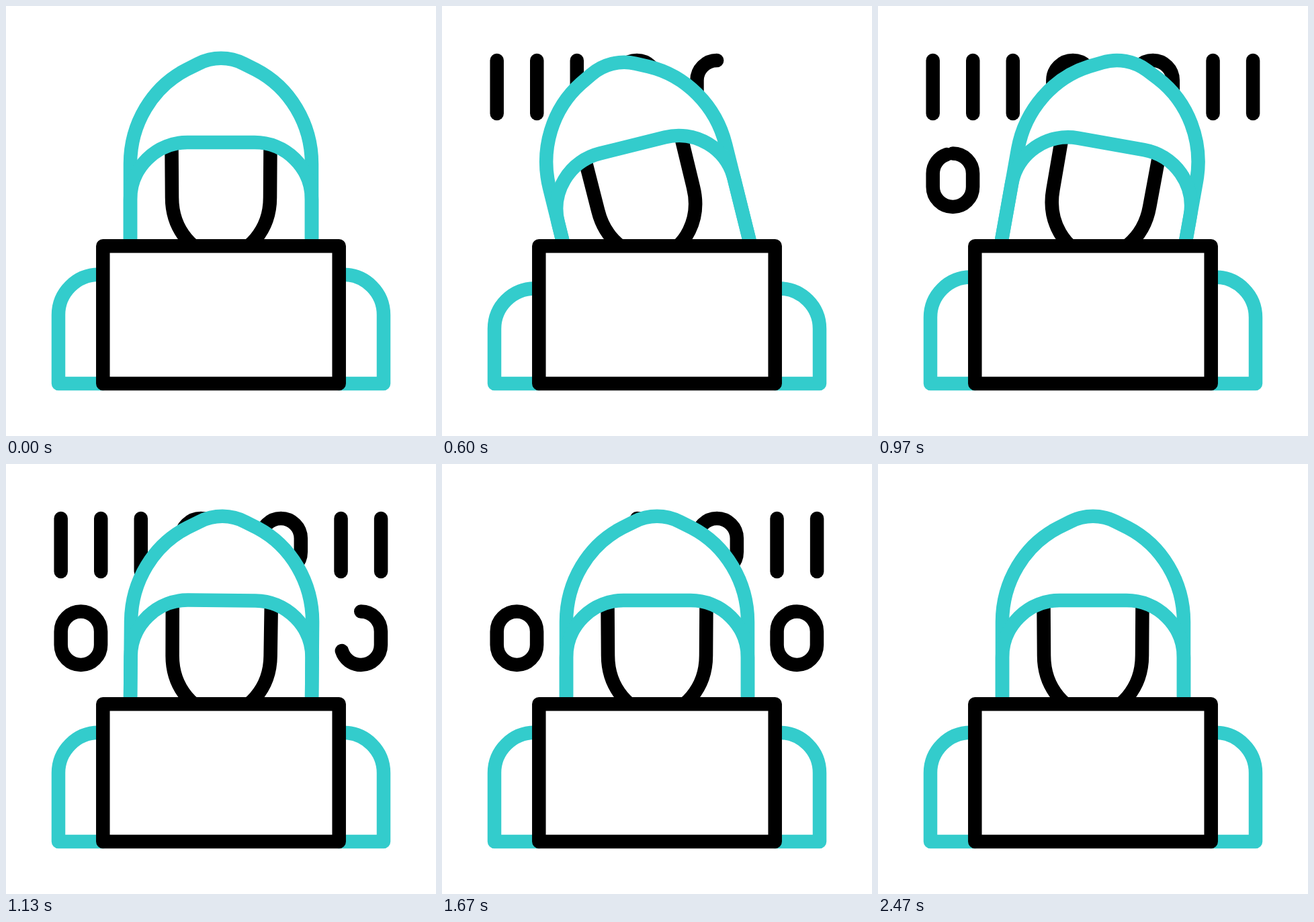
An HTML page for the animation above (2.5 s loop, 640x640 px).

```html
<!DOCTYPE html>
<html lang="en">
<head>
<meta charset="utf-8">
<title>Hooded figure at a laptop</title>
<style>
  html, body { margin: 0; height: 100%; overflow: hidden; background: #fff; }
  svg { display: block; width: 100vw; height: 100vh; }
  path { fill: none; stroke: #000; stroke-width: 20.5; stroke-linecap: round; stroke-linejoin: round; }
  .teal { stroke: #3cc; }
  .solid { fill: #fff; }
</style>
</head>
<body>
<svg viewBox="0 0 640 640">
  <g id="digits"></g>
  <g id="head">
    <path class="teal solid" d="M185 420V235C185 175 218 121 268 95L286 86A75 75 0 0 1 354 86L372 95C422 121 455 175 455 235V420"/>
    <path d="M246.5 208L247 285C247 333 280 372 320 372S393 333 393 285L393.5 208"/>
    <path class="teal" d="M185 420V288A85 85 0 0 1 270 203H370A85 85 0 0 1 455 288V420"/>
  </g>
  <path id="body" class="teal"/>
  <path class="solid" d="M144.3 357.3H495.7V561.9H144.3Z"/>
</svg>
<script>
const LOOP = 2500, FRAMES = 75;
const ERASE_DELAY = 37.3;
// Each digit is written between two neighbouring marks, in frames.
const marks = [3, 6.5, 10, 11.9, 16.2, 20.4, 22.5, 24.5, 29.2, 36.4];

const column = n => 81.7 + n * 59.55;
const one = n => `M${column(n)} 81V160`;
function zero(n, y, sweep) {
  const r = 29.7, x = column(n) + r, side = sweep ? r : -r;
  const arc = (dx, dy) => `a${r} ${r} 0 0 ${sweep} ${dx} ${dy}`;
  return `M${x} ${y}${arc(side, r)}v20${arc(-side, r)}${arc(-side, -r)}v-20${arc(side, -r)}`;
}

const digits = [
  one(0), one(1), one(2), zero(3, 81, 0), zero(5, 81, 0), one(7), one(8),
  zero(0, 219.6, 1), zero(7, 219.6, 1)
].map(d => {
  const path = document.createElementNS("http://www.w3.org/2000/svg", "path");
  path.setAttribute("d", d);
  path.setAttribute("pathLength", 1);
  return document.getElementById("digits").appendChild(path);
});
const head = document.getElementById("head");
const body = document.getElementById("body");

const progress = (f, from, to) => Math.min(1, Math.max(0, (f - from) / (to - from)));

// Eased value through [frame, value] keys.
function keyed(f, keys) {
  let value = keys[0][1];
  for (let i = 1; i < keys.length; i++) {
    const u = progress(f, keys[i - 1][0], keys[i][0]);
    value += (keys[i][1] - keys[i - 1][1]) * u * u * (3 - 2 * u);
  }
  return value;
}

function draw(f) {
  digits.forEach((path, i) => {
    const end = progress(f, marks[i], marks[i + 1]);
    const start = progress(f - ERASE_DELAY, marks[i], marks[i + 1]);
    path.style.display = end > start ? "" : "none";
    path.style.strokeDasharray = `${end - start} 2`;
    path.style.strokeDashoffset = -start;
  });
  const angle = keyed(f, [[0, 0], [18.5, -14], [27, 12], [35, 0]]);
  head.setAttribute("transform", `rotate(${angle} 320 355)`);
  const top = 399.8 + keyed(f, [[0, 0], [12, 25], [34.5, 0]]);
  body.setAttribute("d",
    `M144 ${top}H138a60 60 0 0 0 -60 60V562H144M496 ${top}H502a60 60 0 0 1 60 60V562H496`);
}

function tick() {
  const time = performance.now() % LOOP;
  draw(Math.floor((time + 4) * FRAMES / LOOP) % FRAMES);
  requestAnimationFrame(tick);
}
tick();
</script>
</body>
</html>
```
